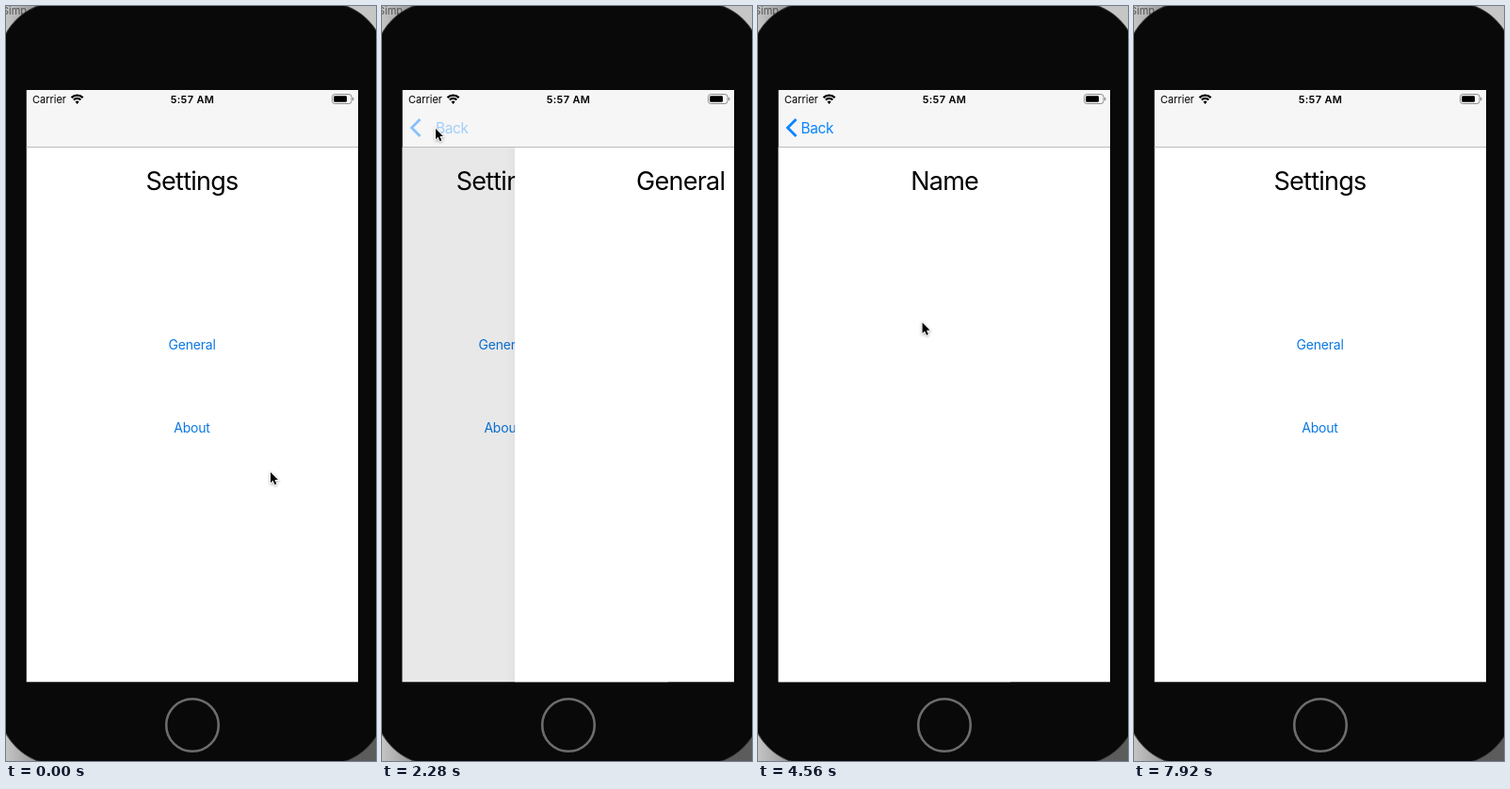
An HTML page with a canvas for the animation above (8000 ms loop, 393 by 800 pixels).

```html
<!DOCTYPE html>
<html lang="en">
<head>
<meta charset="utf-8">
<title>Navigation demo</title>
<style>
html, body { margin: 0; width: 100%; height: 100%; overflow: hidden; background: #090909; }
canvas { display: block; width: 100%; height: 100%; }
</style>
</head>
<body>
<canvas id="stage"></canvas>
<script>
const W = 393, H = 800, LOOP = 8000, STEP = 120;
const canvas = document.getElementById('stage');
const ctx = canvas.getContext('2d');
const dpr = window.devicePixelRatio || 1;
canvas.width = W * dpr;
canvas.height = H * dpr;

const FONT = 'Inter, "Liberation Sans", sans-serif';
const SCREEN = { x: 21.5, y: 89, w: 352.5, h: 627.5 };
const RIGHT = SCREEN.x + SCREEN.w;
const MID = 197.5, NAV_BOTTOM = 150;
const LINK = '#0a78e4', TINT = '#0a84ff';

const PAGES = {
  Settings: [['General', 363.5], ['About', 452]],
  General: [],
  About: [['Name', 363.5]],
  Name: []
};

const MOVES = [
  { at: 1100, under: 'Settings', over: 'General', push: true },
  { at: 2213, under: 'Settings', over: 'General', push: false },
  { at: 3150, under: 'Settings', over: 'About', push: true },
  { at: 4080, under: 'About', over: 'Name', push: true },
  { at: 5333, under: 'About', over: 'Name', push: false },
  { at: 6346, under: 'Settings', over: 'About', push: false }
];

// Pointer stops: time, x, y
const POINTER = [
  [0, 281, 494], [240, 281, 494], [1000, 190, 356], [1560, 190, 356],
  [2150, 57, 130], [2520, 57, 130], [3080, 186, 448], [3400, 186, 448],
  [3960, 191, 368], [4440, 191, 366], [4980, 61, 125], [5600, 61, 125],
  [6000, 55, 129], [6800, 55, 129], [7200, -24, 160]
];

const clamp = v => Math.min(1, Math.max(0, v));

// Critically damped spring, 0 to 1
function spring(ms) {
  if (ms > 700) return 1;
  const x = 0.018 * Math.max(0, ms);
  return 1 - (1 + x) * Math.exp(-x);
}

function text(str, x, y, size, color, opt = {}) {
  ctx.font = `${opt.weight || 400} ${size}px ${FONT}`;
  ctx.letterSpacing = (opt.spacing || 0) + 'px';
  ctx.textAlign = opt.align || 'left';
  ctx.fillStyle = color;
  ctx.fillText(str, x, y);
}

function box(x, y, w, h, r) {
  ctx.beginPath();
  ctx.roundRect(x, y, w, h, r);
}

function alpha(a, draw) {
  ctx.save();
  ctx.globalAlpha *= clamp(a);
  draw();
  ctx.restore();
}

function drawBody() {
  const left = ctx.createLinearGradient(0, 0, 34, 0);
  left.addColorStop(0, '#c4c4c4');
  left.addColorStop(1, '#969696');
  ctx.fillStyle = left;
  ctx.fillRect(0, 0, W / 2, H);
  ctx.fillStyle = '#c6c6c6';
  ctx.fillRect(W / 2, 0, W / 2, H / 2);
  ctx.fillStyle = '#5c5c5c';
  ctx.fillRect(W / 2, H / 2, W / 2, H / 2);
  text('Simp', -4, 9, 11, '#555');

  box(-8, -4, 411, 808, 64);
  ctx.fillStyle = '#090909';
  ctx.fill();
  ctx.strokeStyle = '#3a3a3a';
  ctx.lineWidth = 1;
  ctx.stroke();

  ctx.beginPath();
  ctx.arc(198, 762, 27.8, 0, 2 * Math.PI);
  ctx.strokeStyle = '#6c6c6c';
  ctx.lineWidth = 2.6;
  ctx.stroke();
}

function drawPage(name, dx, pressed, fade) {
  ctx.fillStyle = '#fff';
  ctx.fillRect(SCREEN.x + dx, NAV_BOTTOM, SCREEN.w, SCREEN.y + SCREEN.h - NAV_BOTTOM);
  text(name, MID + dx, 195, 27, '#000', { spacing: -0.75, align: 'center' });
  for (const [label, y] of PAGES[name]) {
    alpha(label === pressed ? fade : 1, () =>
      text(label, MID + dx, y, 14, LINK, { spacing: -0.2, align: 'center' }));
  }
}

function drawPages(move, q, t) {
  const fade = move.push ? 0.2 + 0.8 * clamp((t - move.at) / 300) : 1;
  drawPage(move.under, -0.3 * SCREEN.w * q, move.over, fade);
  if (q <= 0) return;

  const edge = RIGHT - SCREEN.w * q;
  ctx.fillStyle = `rgba(0,0,0,${Math.min(0.1, 0.135 * q)})`;
  ctx.fillRect(SCREEN.x, NAV_BOTTOM, SCREEN.w, SCREEN.h);
  const shade = ctx.createLinearGradient(edge - 9, 0, edge, 0);
  shade.addColorStop(0, 'rgba(0,0,0,0)');
  shade.addColorStop(1, `rgba(0,0,0,${0.04 * q})`);
  ctx.fillStyle = shade;
  ctx.fillRect(edge - 9, NAV_BOTTOM, 9, SCREEN.h);
  drawPage(move.over, edge - SCREEN.x);
}

function drawBack(dx, a) {
  alpha(a, () => text('Back', 45.5 + dx, 134.5, 15.5, TINT, { spacing: -0.4 }));
}

function drawChevron(a) {
  alpha(a, () => {
    ctx.beginPath();
    ctx.moveTo(40.5, 120);
    ctx.lineTo(31.5, 129);
    ctx.lineTo(40.5, 138);
    ctx.strokeStyle = TINT;
    ctx.lineWidth = 2.8;
    ctx.stroke();
  });
}

function drawNav(move, q) {
  ctx.fillStyle = '#f6f6f6';
  ctx.fillRect(SCREEN.x, SCREEN.y, SCREEN.w, NAV_BOTTOM - SCREEN.y);
  ctx.fillStyle = '#bcbcbc';
  ctx.fillRect(SCREEN.x, NAV_BOTTOM - 1, SCREEN.w, 1);

  const nested = move.under !== 'Settings';
  const slide = (move.push ? 56 : 42) * Math.pow(1 - q, 1.2);
  const shown = move.push ? q : Math.max(Math.pow(q, 2.5), 0.6 * q * (1 - q));
  drawBack(slide, shown);
  if (nested) drawBack(-73 * q, 1 - q);
  drawChevron(nested ? 1 : Math.pow(shown, 0.75));
}

function drawStatus() {
  text('Carrier', 28, 103, 11, '#000');
  text('5:57 AM', 198, 103, 11, '#000', { weight: 600, spacing: 0.35, align: 'center' });

  ctx.strokeStyle = '#000';
  ctx.lineWidth = 2.3;
  for (const r of [5.2, 8.6]) {
    ctx.beginPath();
    ctx.arc(75.6, 103.2, r, -Math.PI * 0.75, -Math.PI * 0.25);
    ctx.stroke();
  }
  ctx.beginPath();
  ctx.moveTo(75.6, 104);
  ctx.arc(75.6, 103.4, 2.8, -Math.PI * 0.75, -Math.PI * 0.25);
  ctx.fillStyle = '#000';
  ctx.fill();

  box(346.5, 93.5, 20.5, 10, 2.8);
  ctx.strokeStyle = '#8c8c8c';
  ctx.lineWidth = 1;
  ctx.stroke();
  box(348.2, 95.2, 13.8, 6.6, 1.3);
  ctx.fill();
  box(368, 96.8, 1.3, 3.4, 0.6);
  ctx.fillStyle = '#8c8c8c';
  ctx.fill();
}

function pointerAt(t) {
  let i = POINTER.length - 1;
  while (POINTER[i][0] > t) i--;
  const a = POINTER[i], b = POINTER[i + 1] || a;
  const u = a === b ? 0 : (t - a[0]) / (b[0] - a[0]);
  const e = u * u * (3 - 2 * u);
  return [a[1] + (b[1] - a[1]) * e, a[2] + (b[2] - a[2]) * e];
}

function drawPointer(t) {
  const [x, y] = pointerAt(t);
  ctx.save();
  ctx.translate(x, y);
  ctx.scale(0.9, 0.9);
  ctx.beginPath();
  ctx.moveTo(0, 0);
  for (const [px, py] of [[0, 12.5], [2.8, 9.8], [5, 14.6], [7, 13.6], [4.9, 9], [8.8, 8.8]]) {
    ctx.lineTo(px, py);
  }
  ctx.closePath();
  ctx.shadowColor = 'rgba(0,0,0,0.35)';
  ctx.shadowBlur = 3 * dpr;
  ctx.shadowOffsetY = dpr;
  ctx.strokeStyle = '#fff';
  ctx.lineWidth = 1.8;
  ctx.stroke();
  ctx.shadowColor = 'transparent';
  ctx.fillStyle = '#000';
  ctx.fill();
  ctx.restore();
}

function draw(t) {
  const move = MOVES.filter(m => m.at <= t).pop() || MOVES[MOVES.length - 1];
  const p = t < MOVES[0].at ? 1 : spring(t - move.at);
  const q = move.push ? p : 1 - p;

  ctx.setTransform(dpr, 0, 0, dpr, 0, 0);
  drawBody();
  ctx.save();
  ctx.beginPath();
  ctx.rect(SCREEN.x, SCREEN.y, SCREEN.w, SCREEN.h);
  ctx.clip();
  drawPages(move, q, t);
  drawNav(move, q);
  drawStatus();
  ctx.restore();
  drawPointer(t);
}

const start = performance.now();
function tick() {
  const t = (performance.now() - start) % LOOP;
  draw(Math.floor(t / STEP) * STEP);
  requestAnimationFrame(tick);
}
tick();
</script>
</body>
</html>
```
